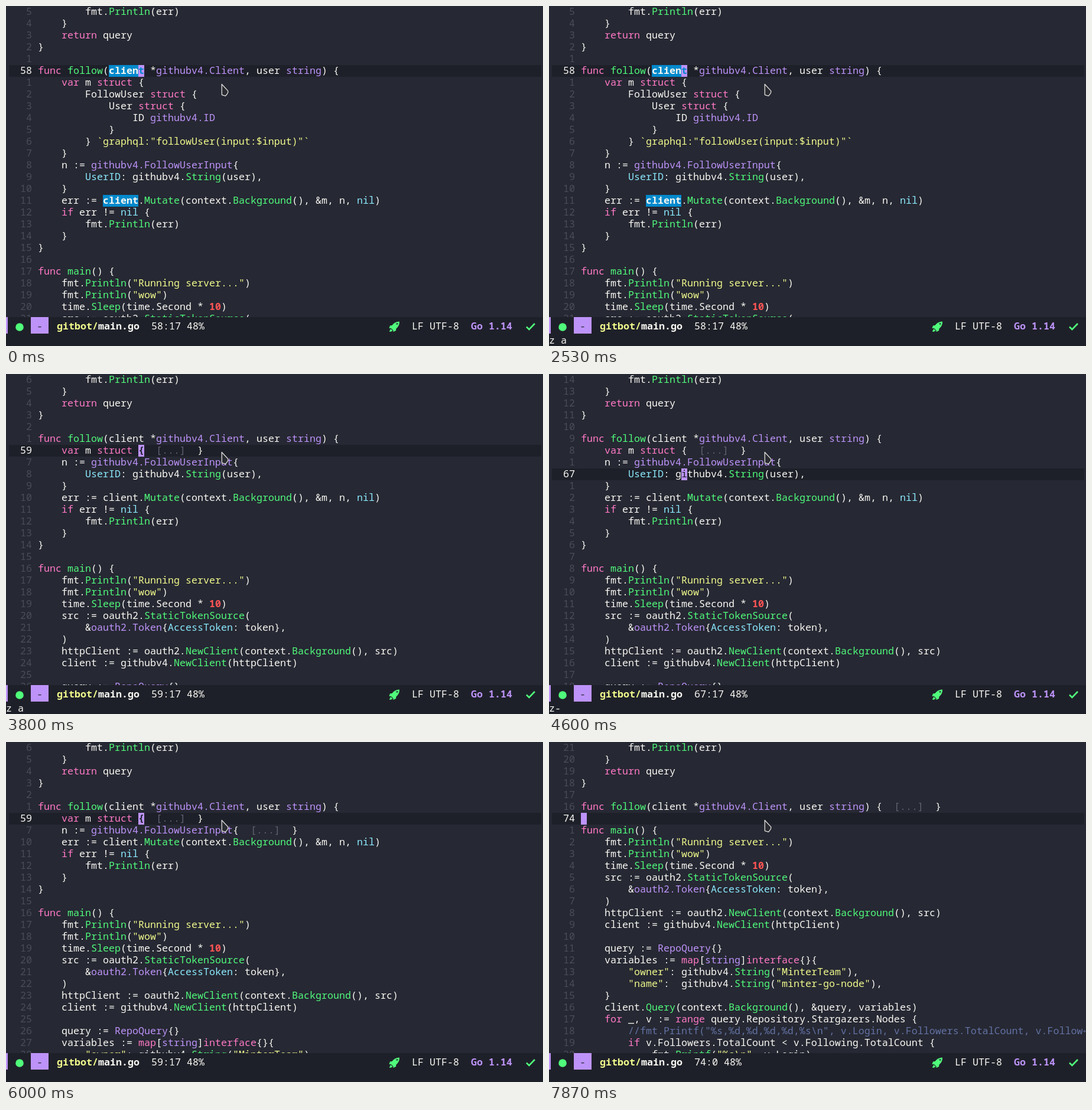
Animation of 909x576 px, one loop 8000 ms. Source, as an HTML page:

```html
<!DOCTYPE html>
<html lang="en">
<head>
<meta charset="utf-8">
<title>Code folding</title>
<style>
  html, body { margin: 0; width: 100%; height: 100%; overflow: hidden; background: #262833; }
  svg { display: block; }
  text {
    font: 16.6667px "Noto Sans Mono", "DejaVu Sans Mono", monospace;
    font-variant-ligatures: none;
    white-space: pre;
    fill: #f8f8f2;
  }
  .key { fill: #ff79c6; }
  .fn { fill: #50fa7b; }
  .type { fill: #bd93f9; }
  .str { fill: #f1fa8c; }
  .const { fill: #8be9fd; }
  .num { fill: #ff5555; font-weight: 700; }
  .note { fill: #6272a4; }
  .fold { fill: #5f6270; }
  .gutter { fill: #4a4d59; }
  .bold { font-weight: 700; }
</style>
</head>
<body>
<svg width="909" height="576" viewBox="0 0 909 576">
  <rect width="909" height="576" fill="#262833"/>
  <g id="code"></g>
  <path d="M365.2 132.5 L375.6 143.6 Q376.6 146 374.6 148.6 L371.6 152.4 L365.4 150.6 Z"
    fill="#2b2d33" stroke="#e4e4e0" stroke-width="1.3" stroke-linejoin="round"/>
  <rect y="527" width="909" height="49" fill="#1e2029"/>
  <rect y="527" width="3" height="28" fill="#bd93f9"/>
  <circle cx="23" cy="544" r="6.8" fill="#50fa7b"/>
  <rect x="42" y="527" width="30" height="28" fill="#bd93f9"/>
  <text x="52" y="548" style="fill:#282a36">-</text>
  <text x="86" y="548" class="str bold">gitbot/</text>
  <text x="156" y="548" class="bold">main.go</text>
  <text x="246" y="548" id="place"></text>
  <g fill="#50fa7b">
    <path d="M666 534.5 Q658 534.5 653.5 541 L650 541.5 L648.5 546 L652 546 L655.5 549.5 L655.5 552 L660 550 L660.5 546.5 Q666.5 541.5 666 534.5 Z"/>
    <path d="M651.5 547 L654.5 550 Q652.5 552 649 552 Q649.500 548.500 651.500 547 Z"/>
    <circle cx="662" cy="538.5" r="1.3" fill="#1e2029"/>
  </g>
  <text x="687" y="548">LF UTF-8</text>
  <text x="787" y="548" class="type bold">Go 1.14</text>
  <path d="M881 543.500 L885.500 548 L895 538" fill="none" stroke="#50fa7b" stroke-width="2.6"/>
  <text x="0" y="571.5" id="echo"></text>
</svg>
<script>
const FIRST = 53, CELL = 10, LEFT = 54, ROW = 20, LOOP = 8000;
const lines = [
  '        fmt.Println(err)',
  '    }',
  '    return query',
  '}',
  '',
  'func follow(client *githubv4.Client, user string) {',
  '    var m struct {',
  '        FollowUser struct {',
  '            User struct {',
  '                ID githubv4.ID',
  '            }',
  '        } `graphql:"followUser(input:$input)"`',
  '    }',
  '    n := githubv4.FollowUserInput{',
  '        UserID: githubv4.String(user),',
  '    }',
  '    err := client.Mutate(context.Background(), &m, n, nil)',
  '    if err != nil {',
  '        fmt.Println(err)',
  '    }',
  '}',
  '',
  'func main() {',
  '    fmt.Println("Running server...")',
  '    fmt.Println("wow")',
  '    time.Sleep(time.Second * 10)',
  '    src := oauth2.StaticTokenSource(',
  '        &oauth2.Token{AccessToken: token},',
  '    )',
  '    httpClient := oauth2.NewClient(context.Background(), src)',
  '    client := githubv4.NewClient(httpClient)',
  '',
  '    query := RepoQuery{}',
  '    variables := map[string]interface{}{',
  '        "owner": githubv4.String("MinterTeam"),',
  '        "name":  githubv4.String("minter-go-node"),',
  '    }',
  '    client.Query(context.Background(), &query, variables)',
  '    for _, v := range query.Repository.Stargazers.Nodes {',
  '        //fmt.Printf("%s,%d,%d,%d,%d,%s\\n", v.Login, v.Followers.TotalCount, v.Follow',
  '        if v.Followers.TotalCount < v.Following.TotalCount {',
  '            fmt.Printf("%s\\n", v.Login)'
];

// opening line -> last hidden line
const folds = { 58: 73, 59: 65, 66: 68 };

const start = { line: 58, echo: '', marks: true, 58: false, 59: false, 66: false };
const open = 'z-', done = 'z a';
const events = [
  [870, { echo: open }], [930, { echo: done }], [1000, { 58: true }],
  [1400, { echo: open }], [1530, { echo: done }], [1600, { 58: false }],
  [2330, { echo: open }], [2530, { echo: done }], [2600, { 58: true }],
  [2870, { echo: open }], [2930, { echo: done }], [3000, { 58: false }],
  [3400, { line: 59, marks: false }], [3470, { echo: '' }],
  [3600, { echo: open }], [3670, { echo: done }], [3730, { 59: true }],
  [4130, { line: 66 }], [4200, { echo: '' }], [4330, { line: 67 }],
  [4600, { echo: open }], [4730, { echo: done }], [4800, { 66: true }],
  [5530, { line: 66 }], [5600, { echo: '' }], [5800, { line: 59 }],
  [6270, { line: 58 }], [6400, { marks: true }],
  [6530, { echo: open }], [6670, { echo: done }], [6730, { 58: true }],
  [7800, { line: 74, marks: false }], [7870, { echo: '' }]
];

const syntax = new RegExp([
  '(?<note>//.*)',
  '(?<str>"[^"]*"|`[^`]*`)',
  '(?<key>\\b(?:func|var|struct|return|if|for|range|map|interface)\\b)',
  '(?<type>\\bgithubv4\\.(?:Client|ID|FollowUserInput)\\b|\\boauth2\\.Token\\b|\\bRepoQuery\\b|\\bstring\\b)',
  '(?<const>\\bnil\\b|\\b[A-Z]\\w*(?=: ))',
  '(?<fn>\\b(?:[A-Z]\\w*|follow|main)(?=\\())',
  '(?<num>\\b10\\b)',
  '(?<fold>\\[\\.{3}\\])'
].join('|'), 'g');

const escape = s => s.replace(/&/g, '&amp;').replace(/</g, '&lt;');
const colX = col => LEFT + col * CELL;
const rect = (x, y, w, fill) => `<rect x="${x}" y="${y}" width="${w}" height="${ROW}" fill="${fill}"/>`;
const text = (x, y, s, cls = '', fill = '') =>
  `<text x="${x}" y="${y + 15}" class="${cls}"${fill && ` style="fill:${fill}"`}>${escape(s)}</text>`;

function paint(src, y) {
  let out = '', at = 0;
  const put = (s, col, cls) => {
    const lead = s.length - s.trimStart().length;
    if (s.trim()) out += text(colX(col + lead), y, s.trim(), cls);
  };
  for (const m of src.matchAll(syntax)) {
    put(src.slice(at, m.index), at);
    put(m[0], m.index, Object.keys(m.groups).find(k => m.groups[k]));
    at = m.index + m[0].length;
  }
  put(src.slice(at), at);
  return out;
}

function cell(src, col, y, bg, fg, cls = '') {
  return rect(colX(col), y, CELL, bg) + text(colX(col), y, src[col] || ' ', cls, fg);
}

function drawRow(n, y, s) {
  const folded = s[n];
  const base = lines[n - FIRST];
  const src = base + (folded ? '  [...]  }' : '');
  const inside = folded && s.line > n && s.line <= folds[n];
  const current = s.line === n;
  let out = '';
  if (current || inside) out += rect(5, y, 901, '#1e2029');
  const num = String(current ? n : Math.abs(n - s.line));
  out += text(44 - num.length * CELL, y, num, current ? '' : 'gutter');
  out += paint(src, y);

  if (s.marks && (n === 58 || n === 69)) {
    const col = src.indexOf('client');
    out += rect(colX(col), y, 60, '#0189cc') + text(colX(col), y, 'client', 'bold');
  }
  if (n === 65 && s.line === 59)
    out += cell(src, 4, y, '#20222b', '#ff5555', 'bold');
  if (n === 92)
    out += `<path d="M904 ${y + 10} h4 m-2 -2 l2 2 l-2 2" fill="none" stroke="#6272a4"/>`;
  if (current || inside) {
    const col = inside ? base.length + 2 : n === 74 ? 0 : 17;
    const strong = n === 59 || (n === 58 && s.marks);
    out += cell(src, col, y, '#bd93f9', n === 58 && s.marks ? '#0189cc' : '#1e2029', strong ? 'bold' : '');
  }
  return out;
}

const get = id => document.getElementById(id);
const code = get('code'), place = get('place'), echo = get('echo');
let shown = -1;

function draw(t) {
  const count = events.filter(e => e[0] <= t).length;
  if (count === shown) return;
  shown = count;
  const s = Object.assign({}, start, ...events.slice(0, count).map(e => e[1]));
  let out = '', y = 0;
  for (let n = FIRST; n < FIRST + lines.length && y < 527; n++, y += ROW) {
    out += drawRow(n, y, s);
    if (s[n]) n = folds[n];
  }
  code.innerHTML = out;
  place.textContent = `${s.line}:${s.line === 74 ? 0 : 17} 48%`;
  echo.textContent = s.echo;
}

const begin = performance.now();
function tick() {
  draw((performance.now() - begin) % LOOP);
  requestAnimationFrame(tick);
}
tick();
</script>
</body>
</html>
```
